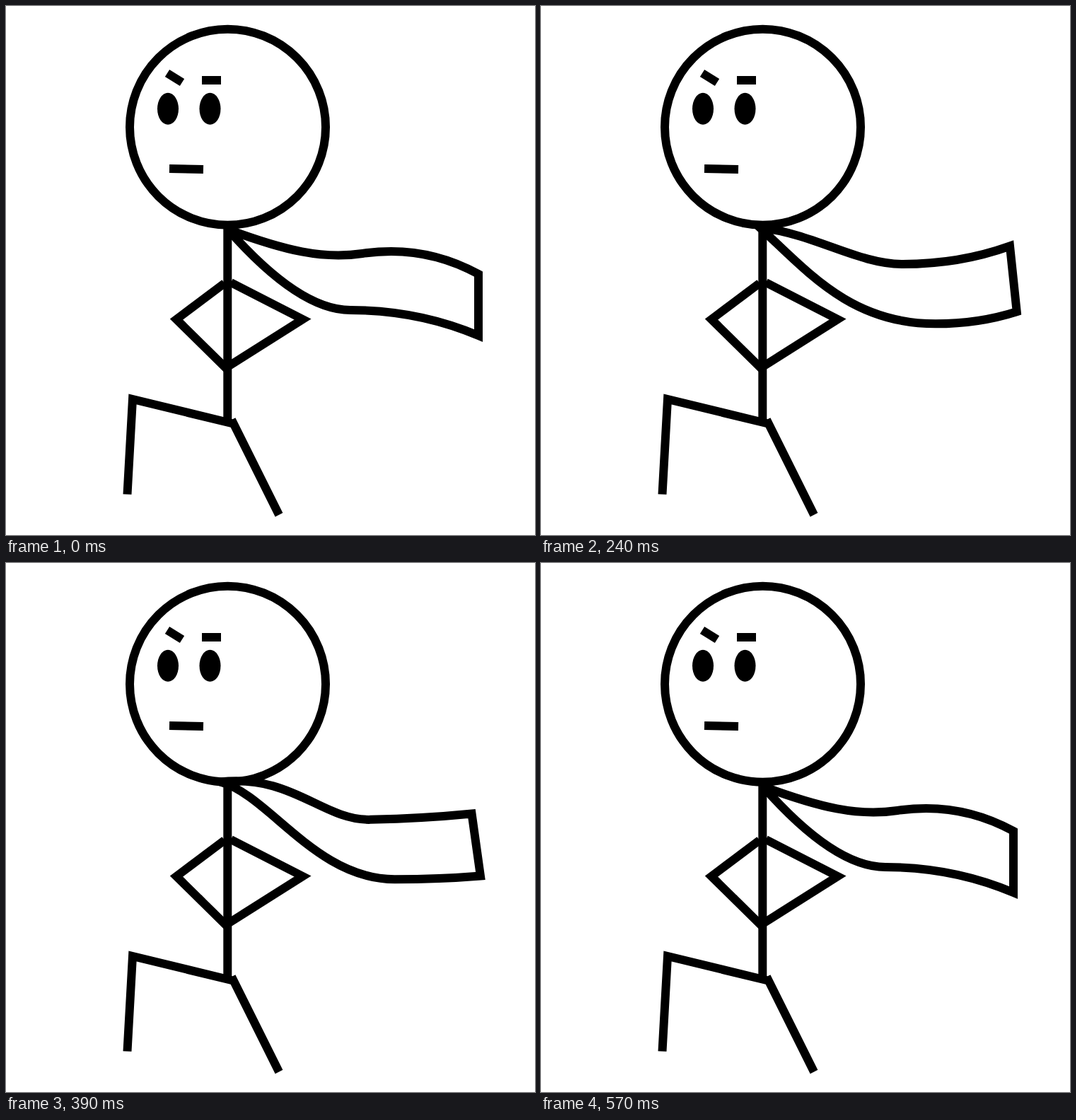
Animation of 748 by 748 pixels, one loop 0.6 s. Source, as an HTML page:

```html
<!DOCTYPE html>
<html lang="en">
<head>
<meta charset="utf-8">
<title>Runner with scarf</title>
<style>
  html, body { margin: 0; width: 100%; height: 100%; overflow: hidden; background: #fff; }
  svg { display: block; width: 100%; height: 100%; }
  .line { fill: none; stroke: #000; stroke-width: 12; }
</style>
</head>
<body>
<svg viewBox="0 0 748 748">
  <g class="line">
    <circle cx="313.5" cy="171.2" r="138.5"/>
    <path d="M228 95L249 108M277 105H304M231 230L279 231"/>
    <path d="M313.3 312V589"/>
    <path d="M309 392L241 443L313 514M318 391L419.5 443L312 511"/>
    <path d="M171.5 690.5L179 556L319 590M319 585L386 719.5"/>
    <path id="scarf"/>
  </g>
  <ellipse cx="229" cy="145.3" rx="15" ry="22.5"/>
  <ellipse cx="288.5" cy="145.3" rx="15" ry="22.5"/>
</svg>
<script>
const STEP = 30, STEPS = 20;

// Each edge of the cloth leaves the neck towards "pull", levels out at "bend"
// with the given slope and ends at "tip".
const edge = (pull, bend, tip, slope = 0) => ({ pull, bend, tip, slope });

const rest = {
  neck: [314, 316],
  upper: edge([395, 346], [504, 350], [668, 379], -0.15),
  lower: edge([381, 392], [487, 430], [668, 466]),
};
const lifted = {
  neck: [314, 316],
  upper: edge([377, 338], [509, 365], [666, 334]),
  lower: edge([381, 405], [557, 449], [673.4, 429]),
};
const curled = {
  neck: [301, 308.5],
  upper: edge([406, 290], [517, 365], [657, 350.5]),
  lower: edge([370, 317], [560, 450], [671.4, 438.5]),
};

const keys = [[0, rest], [6, lifted], [12, curled], [STEPS - 1, rest]];
const scarf = document.getElementById("scarf");

function blend(a, b, mix) {
  if (typeof a === "number") return a + (b - a) * mix;
  if (Array.isArray(a)) return a.map((v, i) => blend(v, b[i], mix));
  return Object.fromEntries(Object.keys(a).map(k => [k, blend(a[k], b[k], mix)]));
}

function poseAt(step) {
  const next = Math.max(1, keys.findIndex(([at]) => at >= step));
  const [start, from] = keys[next - 1];
  const [end, to] = keys[next];
  return blend(from, to, (step - start) / (end - start));
}

// Handles on either side of the bend lie on its tangent.
function handles({ bend: [x, y], tip, slope }, crestX) {
  const on = hx => [hx, y + slope * (hx - x)];
  return { before: on(crestX), after: on(x + (tip[0] - x) * 0.53) };
}

function outline({ neck, upper, lower }) {
  const u = handles(upper, 448), l = handles(lower, 438);
  return `M${neck}C${[upper.pull, u.before, upper.bend]}Q${[u.after, upper.tip]}`
       + `L${lower.tip}Q${[l.after, lower.bend]}C${[l.before, lower.pull, neck]}Z`;
}

function draw(ms) {
  scarf.setAttribute("d", outline(poseAt(Math.floor(ms / STEP) % STEPS)));
}

const begin = performance.now();
function tick() {
  draw(performance.now() - begin);
  requestAnimationFrame(tick);
}
tick();
</script>
</body>
</html>
```
